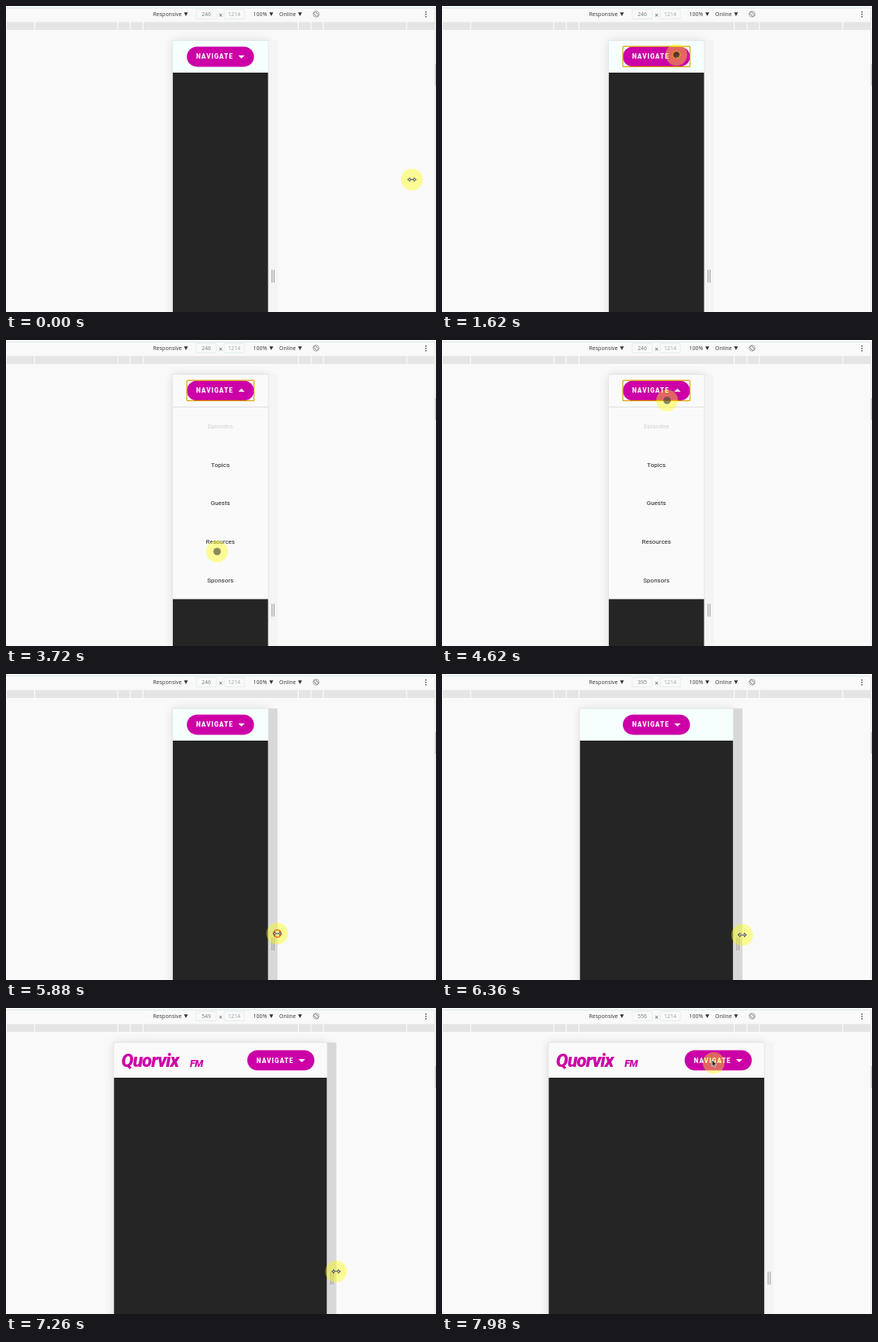
Write an HTML page with a canvas that moves like this. It is 554 px wide and 395 px high and loops after 8000 ms.

```html
<!DOCTYPE html>
<html lang="en">
<head>
<meta charset="utf-8">
<title>Responsive menu demo</title>
<style>
html, body { margin: 0; width: 100%; height: 100%; overflow: hidden; background: #f9f9f9; }
canvas { display: block; }
</style>
</head>
<body>
<canvas id="stage" width="554" height="395"></canvas>
<script>
const ctx = document.getElementById('stage').getContext('2d');
const LOOP = 8000, STEP = 60;
const MID = 276.5, TOP = 45;
const PINK = '#cc00a6', DARK = '#252525', PALE = '#fafafa';
const UI = '"Open Sans", "Noto Sans", sans-serif';
const BRAND = 'Roboto, sans-serif';
const ITEMS = ['Episodes', 'Topics', 'Guests', 'Resources', 'Sponsors'];

// time, x, y
const PATH = [
  [0, 523, 224], [660, 302, 63], [3000, 302, 63], [3720, 272, 273],
  [3840, 272, 282], [4620, 290, 78], [4800, 301, 66], [5040, 301, 66],
  [5500, 359, 305], [5700, 349.5, 335]
];

const clamp = v => Math.min(1, Math.max(0, v));
const span = (t, a, b) => clamp((t - a) / (b - a));
const smooth = u => u * u * (3 - 2 * u);
const mix = (a, b, u) => a + (b - a) * u;

function rect(x, y, w, h, color) {
  ctx.fillStyle = color;
  ctx.fillRect(x, y, w, h);
}

function poly(points, color) {
  ctx.beginPath();
  points.forEach(([x, y]) => ctx.lineTo(x, y));
  ctx.closePath();
  ctx.fillStyle = color;
  ctx.fill();
}

function disc(x, y, r, color) {
  ctx.beginPath();
  ctx.arc(x, y, r, 0, Math.PI * 2);
  ctx.fillStyle = color;
  ctx.fill();
}

function ring(x, y, r, color, width) {
  ctx.beginPath();
  ctx.arc(x, y, r, 0, Math.PI * 2);
  ctx.strokeStyle = color;
  ctx.lineWidth = width;
  ctx.stroke();
}

function box(x, y, w, h, r, color, width = 1) {
  ctx.beginPath();
  ctx.roundRect(x, y, w, h, r);
  ctx.strokeStyle = color;
  ctx.lineWidth = width;
  ctx.stroke();
}

function text(str, x, y, font, color, align = 'left', spacing = 0) {
  ctx.font = font;
  ctx.fillStyle = color;
  ctx.textAlign = align;
  ctx.letterSpacing = spacing + 'px';
  ctx.fillText(str, x, y);
}

function caret(x, y, half, height, color) {
  poly([[x - half, y], [x + half, y], [x, y + height]], color);
}

function widthAt(t) {
  const u = span(t, 5880, 7440);
  return Math.round(246 + 310 * (1 - Math.pow(1 - u, 1.78)));
}

function cursorAt(t) {
  if (t >= 7500) {
    const u = smooth(span(t, 7500, 7980));
    return [mix(427.5, 350, u), mix(341, 71, u)];
  }
  if (t >= 5880) return [MID + widthAt(t) / 4 + 11.5, mix(335, 341, span(t, 5880, 7500))];
  const i = PATH.findIndex(p => p[0] > t);
  if (i < 0) return PATH[PATH.length - 1].slice(1);
  const a = PATH[i - 1], b = PATH[i];
  const u = smooth(span(t, a[0], b[0]));
  return [mix(a[1], b[1], u), mix(a[2], b[2], u)];
}

function drawToolbar(width) {
  rect(0, 0, 554, 395, '#f9f9f9');
  rect(0, 0, 554, 2, '#fff');
  rect(0, 2, 553, 1, '#d5e6e5');
  const font = '7px ' + UI, ink = '#333';
  text('Responsive', 189.5, 13.3, font, ink);
  caret(231.8, 8.3, 2.5, 4.6, ink);
  box(245, 4.5, 26, 12, 1, '#e2efed');
  text(width, 258, 13.3, font, '#6b7f80', 'center');
  text('×', 276.5, 15, '9px ' + UI, '#555', 'center');
  box(281, 4.5, 26, 12, 1, '#e2efed');
  text('1214', 294, 13.3, font, '#98a5a5', 'center');
  text('100%', 318.5, 13.3, font, ink);
  caret(341.8, 8.3, 2.5, 4.6, ink);
  text('Online', 352, 13.3, font, ink);
  caret(378.8, 8.3, 2.5, 4.6, ink);

  ring(399.5, 10.5, 3.8, '#888', 0.8);
  ctx.save();
  ctx.translate(399.5, 10.5);
  ctx.rotate(-Math.PI / 4);
  rect(-1.9, -3.4, 3.8, 6.8, '#f9f9f9');
  box(-1.6, -3, 3.2, 6, 0.5, '#555', 0.8);
  ctx.restore();
  for (let i = 0; i < 3; i++) disc(541, 7.8 + i * 3, 0.9, '#444');

  rect(0, 20, 553, 11.5, '#fff');
  rect(1, 20.5, 551, 10.5, '#e5e5e5');
  for (const half of [239.7, 132.4, 116.5, 100]) {
    rect(MID - half - 0.5, 20, 1, 11.5, '#fff');
    rect(MID + half - 0.5, 20, 1, 11.5, '#fff');
  }
  rect(552, 2, 1, 393, '#e3e8e8');
  rect(552.5, 75, 1.5, 28, '#cfd3d3');
}

function drawButton(x, y, open, focused) {
  ctx.beginPath();
  ctx.roundRect(x, y, 86.5, 26, 13);
  ctx.fillStyle = PINK;
  ctx.fill();
  text('NAVIGATE', x + 12, y + 16, '900 8.2px ' + BRAND, '#fff', 'left', 1.05);
  if (open) caret(x + 70.3, y + 14.3, 4.2, -4, '#fff');
  else caret(x + 70.3, y + 11.4, 4.2, 4, '#fff');
  if (focused) box(x, y - 0.2, 86.5, 26.2, 1, '#dba000', 1.2);
}

function drawPage(t, width) {
  const left = MID - width / 4 - 0.2, w = width / 2, right = left + w;
  const open = smooth(span(t, 1620, 2100)) * (1 - smooth(span(t, 4920, 5400)));
  const wide = width >= 528;
  const headEnd = wide ? 90 : 86;
  const menuEnd = headEnd + 248.5 * open;

  ctx.save();
  ctx.shadowColor = 'rgba(0,0,0,.13)';
  ctx.shadowBlur = 12;
  rect(left, TOP, w, 370, PALE);
  ctx.restore();

  const hover = t >= 5580 && t < 7560;
  rect(right, TOP - 0.5, 12, 351, hover ? '#d8d8d8' : '#f4f4f4');
  rect(right + 4.3, 340.5, 1.2, 16.5, '#a6a6a6');
  rect(right + 7, 340.5, 1.2, 16.5, '#a6a6a6');

  rect(left, TOP, w, headEnd - TOP, open > 0 || wide ? PALE : '#f5fffd');
  rect(left, menuEnd, w, 395 - menuEnd, DARK);

  if (open > 0) {
    ctx.save();
    ctx.beginPath();
    ctx.rect(left, headEnd, w, menuEnd - headEnd);
    ctx.clip();
    rect(left, headEnd, w, 1, '#dedede');
    ITEMS.forEach((name, i) => {
      text(name, 276.2, 114.2 + i * 49.6, '8px ' + BRAND, i ? '#222' : '#d0d0d0', 'center');
    });
    ctx.restore();
  }
  box(left - 0.3, TOP - 0.5, w + 0.6, 370, 0, '#dfe5e4', 0.7);

  if (wide) {
    const x = left + 9.5;
    text('Quorvix', x, 76.3, 'italic 900 23.5px ' + BRAND, PINK, 'left', -0.9);
    text('FM', x + 88.5, 76.3, 'italic 900 12.8px ' + BRAND, PINK, 'left', -0.5);
    drawButton(right - 102.7, 54.5, false, false);
  } else {
    const toggled = t >= 1680 && t < 4920;
    drawButton(233, 52.4, toggled, t >= 1620 && t < 5880);
  }
}

function resizeIcon(x, y) {
  ctx.save();
  ctx.translate(x, y);
  for (const side of [-1, 1]) {
    const head = [[side * 6, 0], [side * 2.4, -3.1], [side * 2.4, -1],
      [0, -1], [0, 1], [side * 2.4, 1], [side * 2.4, 3.1]];
    poly(head, '#3b3b35');
    poly([[side * 4.7, 0], [side * 3, -1.4], [side * 3, 1.4]], '#fff');
  }
  rect(-2.7, -0.4, 5.4, 0.8, '#fff');
  ctx.restore();
}

function arrowIcon(x, y) {
  const shape = [[0, 0], [0, 8.4], [1.9, 6.7], [3.2, 9.6], [4.6, 9], [3.3, 6.2], [5.9, 6.1]];
  poly(shape.map(([a, b]) => [x + a, y + b]), '#222');
  ctx.strokeStyle = '#fff';
  ctx.lineWidth = 0.7;
  ctx.stroke();
}

function drawCursor(t, width) {
  const [x, y] = cursorAt(t);
  disc(x, y, 14, 'rgba(255,255,0,.4)');
  const pressed = (t >= 1620 && t < 1740) || (t >= 4800 && t < 4920);
  const inside = Math.abs(x - MID) < width / 4 && y > TOP;
  if (t < 60 || (t >= 5580 && t < 7560)) {
    if (t >= 5880 && t < 6000) ring(x, y, 4.8, '#ee6a1c', 1.6);
    resizeIcon(x, y);
  } else if (inside && t < 7560) {
    disc(x, y, 4.8, 'rgba(55,55,55,.58)');
    if (pressed) {
      disc(x, y, 3.6, 'rgba(60,35,30,.6)');
      ring(x, y, 5, '#ef8a30', 1.4);
    }
  } else {
    arrowIcon(x - 2, y - 4);
  }
}

function frame(now) {
  const t = Math.floor(now % LOOP / STEP) * STEP;
  const width = widthAt(t);
  drawToolbar(width);
  drawPage(t, width);
  drawCursor(t, width);
}

const start = performance.now();
(function tick() {
  frame(performance.now() - start);
  requestAnimationFrame(tick);
})();
</script>
</body>
</html>
```
